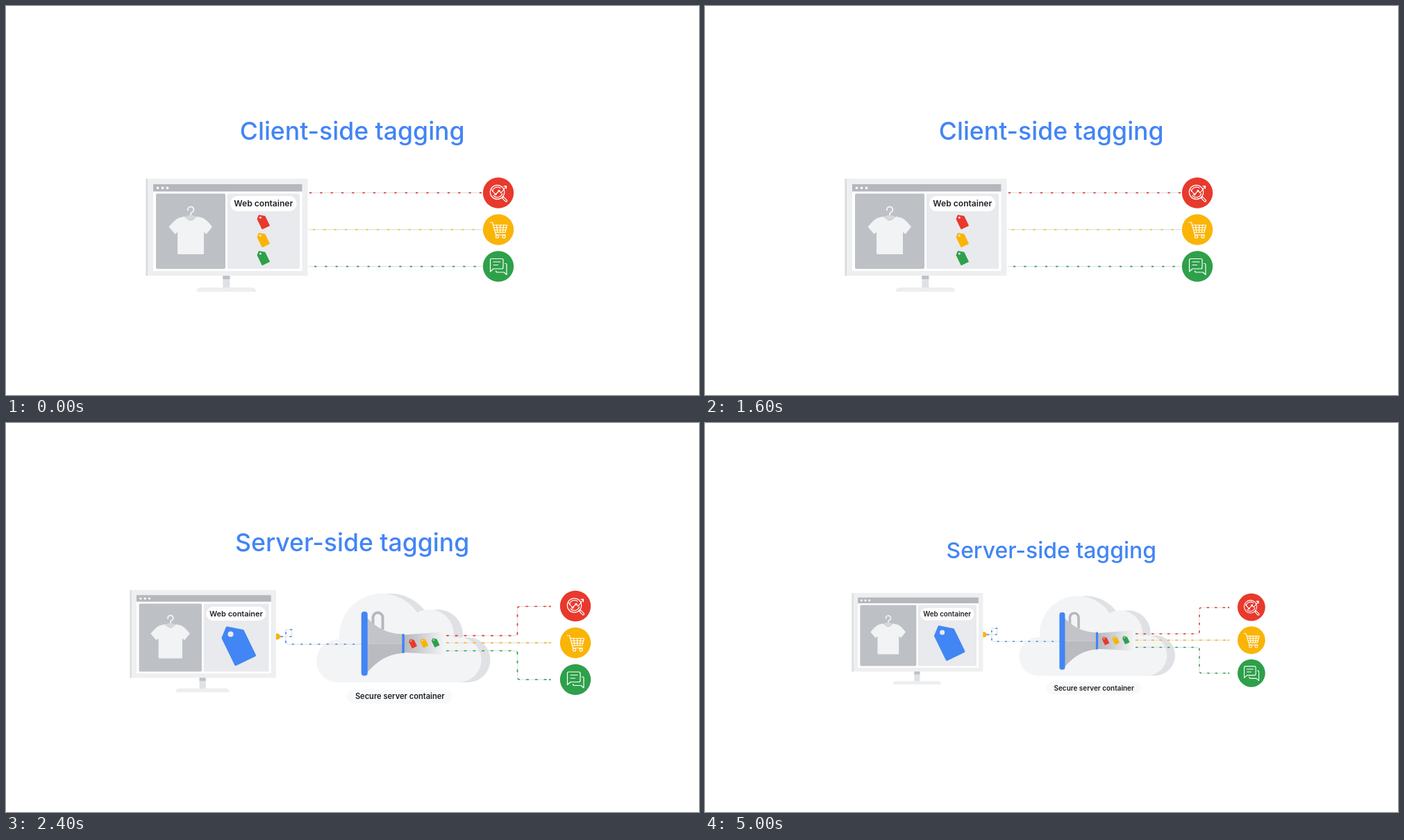
Write an HTML page that moves like this. It is 998 px wide and 561 px high and loops after 5070 ms.

```html
<!DOCTYPE html>
<html lang="en">
<head>
<meta charset="utf-8">
<title>Tagging</title>
<style>
  html, body { margin: 0; width: 100%; height: 100%; overflow: hidden; background: #fff; }
  svg { display: block; width: 100%; height: 100%; }
  text { font-family: Inter, Roboto, sans-serif; font-optical-sizing: none; text-anchor: middle; }
  .title { font-size: 35.6px; font-weight: 500; fill: #4285f4; }
  .label { font-weight: 600; fill: #202124; }
  .line { fill: none; stroke: #dadce0; stroke-width: 1; }
  .dash { fill: none; stroke-width: 1.7; }
  .icon { fill: none; stroke: #fff; stroke-width: 1.2; stroke-linecap: round; stroke-linejoin: round; }
</style>
</head>
<body>
<svg viewBox="0 0 998 561">
  <defs>
    <linearGradient id="beam">
      <stop offset="0" stop-color="#b7b9be"/>
      <stop offset=".3" stop-color="#c6c8cc"/>
      <stop offset="1" stop-color="#f3f4f6"/>
    </linearGradient>
    <g id="screen">
      <rect x="201.5" y="249" width="233" height="140" fill="#eeeff1"/>
      <rect x="201.5" y="249" width="2.6" height="140" fill="#dadce0"/>
      <rect x="212" y="257" width="214.5" height="125" fill="#fff"/>
      <rect x="212" y="257" width="214.5" height="10.5" fill="#b5b7bd"/>
      <g fill="#fff">
        <circle cx="218.5" cy="262.4" r="1.8"/>
        <circle cx="225.5" cy="262.4" r="1.8"/>
        <circle cx="232.5" cy="262.4" r="1.8"/>
      </g>
      <rect x="216" y="270.5" width="100" height="108.5" rx="2" fill="#bdc0c5"/>
      <rect x="319" y="270.5" width="104" height="108.5" rx="2" fill="#e8eaed"/>
      <rect x="312.3" y="389" width="10" height="17.5" fill="#dfe1e5"/>
      <rect x="312.3" y="389" width="10" height="5" fill="#bdc1c6"/>
      <path d="M274.5 412 Q274.5 406 281 406 H354 Q360 406 360 412Z" fill="#eceef0"/>
      <path d="M262 294.5 A4.2 4.2 0 1 1 267.6 297.6 Q266 298.4 266 301 V305" fill="none" stroke="#f1f3f4" stroke-width="2" stroke-linecap="round"/>
      <ellipse cx="266" cy="305" rx="8" ry="3.2" fill="#d5d7da"/>
      <path d="M257 303.5 Q266 315 275 303.5 L283 305.5 Q289 308 297 318.5 L288.5 329 L285 326 V357 Q285 358 284 358 H248 Q247 358 247 357 V326 L243.5 329 L234.5 318.5 Q243 308 249 305.5Z" fill="#f1f3f4"/>
    </g>
    <g id="tag">
      <path d="M-22.5 -11.5 L-16.5 -26 L6 -21.5 L23 13.5 L-4 26.5Z" stroke="currentColor" stroke-width="4" stroke-linejoin="round" fill="currentColor"/>
      <circle cx="-11.5" cy="-17" r="4" fill="#e8eaed"/>
    </g>
    <g id="cloud">
      <circle cx="478" cy="343" r="31"/>
      <circle cx="541" cy="307" r="61"/>
      <circle cx="609" cy="305" r="36"/>
      <circle cx="652" cy="341.5" r="32.5"/>
      <path d="M478 374 V330 L541 300 H609 L652 330 V374Z"/>
    </g>
    <g id="icon0" class="icon">
      <circle cx="-1.5" cy="-1" r="10.2"/>
      <path d="M-8.6 -2 A7.4 7.4 0 0 1 3 -7 M5.6 1 A7.4 7.4 0 0 1 -7 4"/>
      <path d="M-9.5 -4.5 L-4 2.5 L1 -3 L4 0 L11 -9 M8 -9.6 L11.6 -9.8 L11.4 -6"/>
      <path d="M5.5 7.5 L7.5 5.7 L12.6 10.8 Q12.8 12.8 10.6 12.7Z"/>
      <circle cx="-4" cy="2.2" r="1"/>
      <circle cx="1" cy="-3" r="1"/>
    </g>
    <g id="icon1" class="icon">
      <path d="M-12 -10.5 H-8.5 L-3.5 7.5 H10.5 M-7.4 -6.5 H12.5 L9.8 4 H-4.5 M-6.4 -3 H11.6 M-5.4 .5 H10.7"/>
      <path d="M-2.5 -6.5 L-1 4 M2.7 -6.5 V4 M7.8 -6.5 L6.4 4"/>
      <circle cx="-1.5" cy="10" r="2.1"/>
      <circle cx="8" cy="10" r="2.1"/>
    </g>
    <g id="icon2" class="icon">
      <path d="M-10 -11 H5 Q7 -11 7 -9 V1.5 Q7 3.5 5 3.5 H-7 L-11.5 7.5 V-9.5 Q-11.5 -11 -10 -11Z"/>
      <path d="M-7 -6.5 H3 M-7 -2 H-.5"/>
      <path d="M9.5 -4 H10.5 Q12 -4 12 -2.5 V12 L8 8.5 H-1.5 Q-3.5 8.5 -3.5 6.5"/>
    </g>
  </defs>
  <g id="client"></g>
  <g id="server"></g>
</svg>
<script>
const RED = '#e8392d', YELLOW = '#fab406', GREEN = '#2ea04a', BLUE = '#4285f4';
const COLORS = [RED, YELLOW, GREEN];
const LOOP = 5070, FRAME = 1000 / 15;
const client = document.getElementById('client');
const server = document.getElementById('server');

const title = (text, y) => `<text class="title" x="498.7" y="${y}">${text}</text>`;

const label = (text, x, y, size) =>
  `<text class="label" x="${x}" y="${y}" font-size="${size}">${text}</text>`;

const tag = (x, y, scale, color) =>
  `<use href="#tag" transform="translate(${x} ${y}) scale(${scale})" color="${color}"/>`;

const line = (d, color, dashes, offset = 0) =>
  `<path class="line" d="${d}"/>
   <path class="dash" d="${d}" stroke="${color}" stroke-dasharray="${dashes}" stroke-dashoffset="${offset}"/>`;

const badges = (x, top) => COLORS.map((color, i) =>
  `<g transform="translate(${x} ${top + i * 53})">
     <circle r="22.2" fill="${color}"/><use href="#icon${i}"/>
   </g>`).join('');

const webLabel = y =>
  `<rect x="323" y="${y}" width="95.5" height="22" rx="11" fill="#fff"/>` +
  label('Web container', 370.8, y + 15.3, 12.1);

function buildClient() {
  const lines = COLORS.map((color, i) =>
    line(`M436 ${269.3 + i * 53.2} H686`, color, '3.2 12.1', [-1, -6, -8][i])).join('');
  const tags = COLORS.map((color, i) => tag(370.6, 311.5 + i * 26, 0.37, color)).join('');
  return title('Client-side tagging', 193) + '<use href="#screen"/>' +
    webLabel(274) + tags + lines + badges(709, 269.5);
}

function buildServer() {
  const paths = [
    'M634 306.7 H733 Q736.5 306.7 736.5 303.2 V268 Q736.5 264.5 740 264.5 H784',
    'M634 317 H784',
    'M634 328.5 H733 Q736.5 328.5 736.5 332 V366.5 Q736.5 370 740 370 H784'
  ];
  const outputs = paths.map((d, i) => line(d, COLORS[i], '3.8 9')).join('');
  const ends = COLORS.map((color, i) =>
    `<circle cx="783.5" cy="${[264.5, 317, 370][i]}" r="1.2" fill="${color}"/>`).join('');
  const tags = COLORS.map((color, i) =>
    tag(586 + i * 16.3, 318.4 - i * 0.7, 0.235, color)).join('');
  return `${title('Server-side tagging', 185)}
    <g transform="translate(-3.54 16.05) scale(.9034)"><use href="#screen"/>${webLabel(275.6)}</g>
    ${tag(335, 321.5, 1, BLUE)}
    <use href="#cloud" x="13" fill="#dfe1e4"/>
    <use href="#cloud" fill="#f3f4f6"/>
    ${line('M396 308 H411.5 V298 H403 V316 Q403 319 406 319 H512', BLUE, '3 9.5')}
    <path d="M389 303.5 H391 L394.5 305.5 V310.5 L391 312.5 H389Z" fill="${YELLOW}"/>
    <path d="M394.5 308 H397.5" stroke="#9aa0a6" stroke-width="2.4"/>
    <path d="M528.5 292 V280.5 A7 7 0 0 1 542.5 280.5 V298" fill="none" stroke="#b5b7bc" stroke-width="4"/>
    <path d="M520 281 Q541 304 571 304.5 V318.5 H520Z" fill="#c3c4c9"/>
    <path d="M520 318.5 H571 V332 Q543 333 520 360Z" fill="#b9bbc0"/>
    <path d="M573.5 305.5 L631 301 V334 L573.5 331Z" fill="url(#beam)"/>
    <rect x="511.7" y="272" width="9" height="92.5" rx="4" fill="${BLUE}"/>
    <rect x="570.3" y="304" width="3.6" height="28" rx="1.5" fill="${BLUE}"/>
    ${tags}${outputs}${ends}${badges(820, 264)}
    <rect x="491" y="384" width="151.5" height="20.5" rx="10.2" fill="#f8f9fa"/>
    ${label('Secure server container', 567.3, 398, 11.1)}`;
}

// Scale at a distance in ms from rest: swells past full size, then collapses to nothing.
function pop(d) {
  if (d <= 0) return 1;
  const u = d / 402;
  return Math.max(0, 1 + (0.49 + 0.61 * u ** 4) * Math.sin(Math.PI * u));
}

function draw(ms) {
  const t = Math.floor((ms % LOOP + 5) / FRAME) * FRAME;
  const first = t < 1860;
  client.style.display = first ? '' : 'none';
  server.style.display = first ? 'none' : '';
  const scale = pop(Math.max(2398 - t, t - 4586.7));
  server.setAttribute('transform',
    `translate(499 280.5) scale(${scale.toFixed(4)}) translate(-499 -280.5)`);
}

client.innerHTML = buildClient();
server.innerHTML = buildServer();
const start = performance.now();
function tick() {
  draw(performance.now() - start);
  requestAnimationFrame(tick);
}
tick();
</script>
</body>
</html>
```
